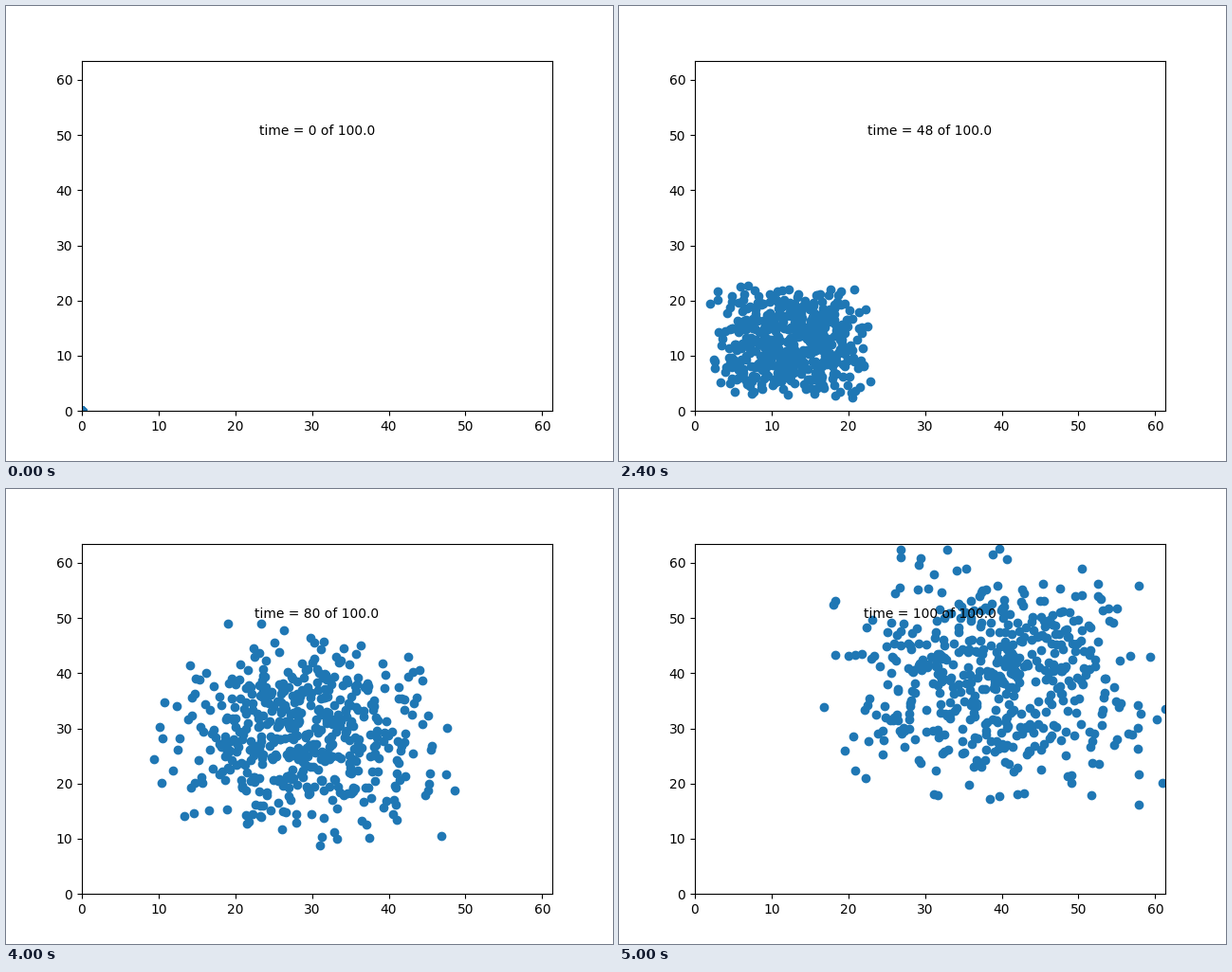
A matplotlib script for the animation above (5100 ms loop, 640 by 480 pixels).

```python
import numpy as np
import matplotlib.pyplot as plt
from matplotlib.animation import FuncAnimation

FRAMES, INTERVAL = 51, 100
T_END, T_START = 100.0, 23.2
LIMITS = np.array([61.32, 63.5])
COUNT = 500
V_MIN, V_MAX = 0.07, 0.94
RUN, RUNS = 20.0, 5    # length and number of stretches at constant speed

# Each particle draws a new speed per axis for every stretch,
# and its stretches begin at a random phase.
rng = np.random.default_rng(7)
speeds = rng.uniform(V_MIN, V_MAX, (RUNS, COUNT * 2, 2))
phase = rng.random((COUNT * 2, 2))
starts = RUN * (np.arange(RUNS)[:, None, None] - phase)


def clock(t):
    """Elapsed motion time: zero at first, then linear after a soft start."""
    return np.log1p(np.exp(t - T_START))


def positions(t):
    moving = np.clip(clock(t) - starts, 0, RUN) - np.clip(-starts, 0, RUN)
    return (speeds * moving).sum(axis=0)


# Show only particles that end within the axes, evenly around the mean
mean_end = (V_MIN + V_MAX) / 2 * (T_END - T_START)
spread = np.abs(positions(T_END) - mean_end)
shown = np.flatnonzero((spread < LIMITS - mean_end).all(axis=1))[:COUNT]

fig, ax = plt.subplots(figsize=(6.4, 4.8), dpi=100)
ax.set_xlim(0, LIMITS[0])
ax.set_ylim(0, LIMITS[1])
dots = ax.scatter(*positions(0)[shown].T, s=36, color="#1f77b4")
label = ax.text(0.5, 0.789, "", transform=ax.transAxes, ha="center")


def draw(frame):
    t = 2 * frame
    dots.set_offsets(positions(t)[shown])
    label.set_text(f"time = {t} of {T_END}")
    return dots, label


anim = FuncAnimation(fig, draw, frames=FRAMES, interval=INTERVAL,
                     repeat=True, repeat_delay=0)
plt.show()
```
